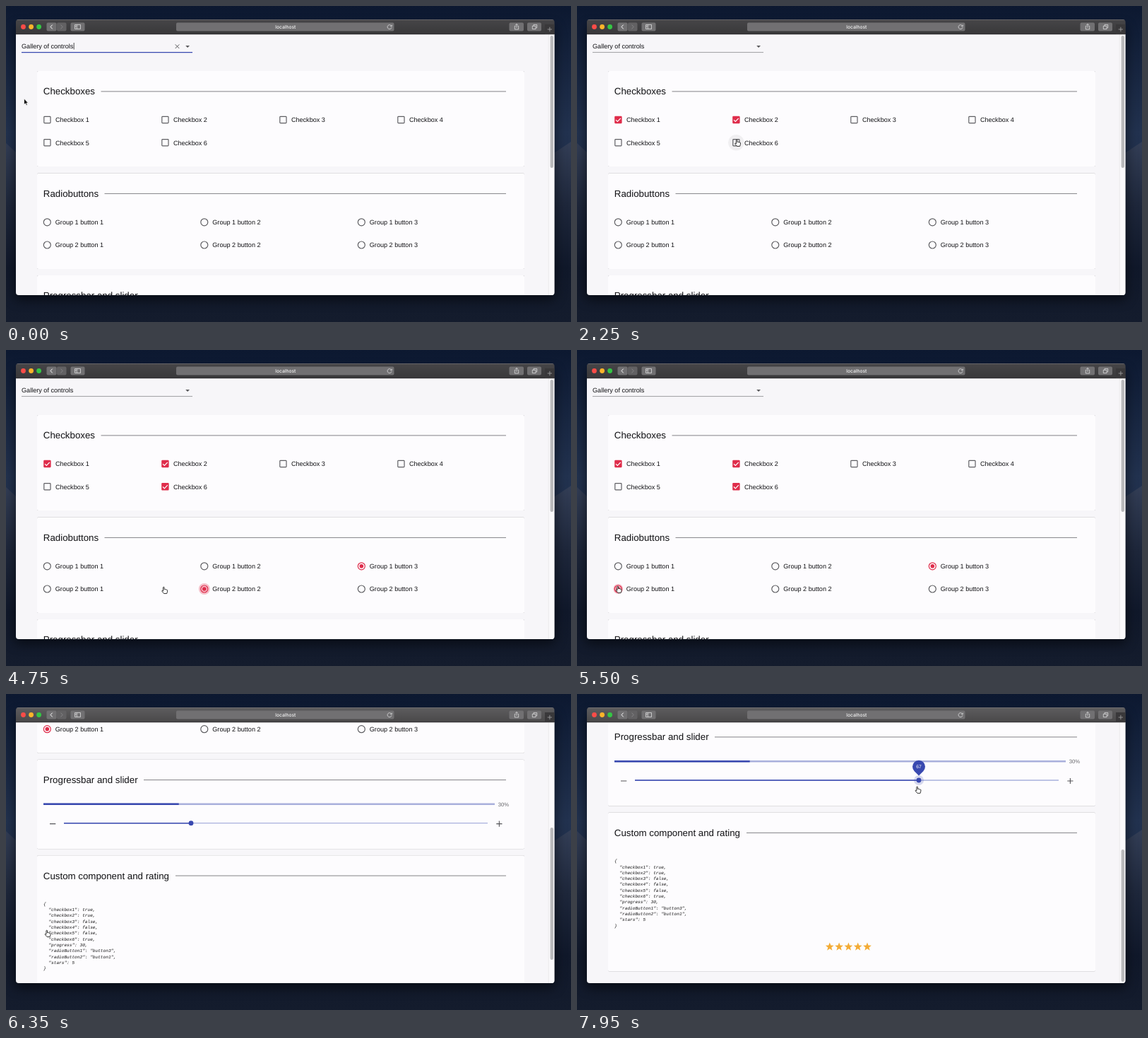
An HTML page that plays this animation: 800 by 447 pixels, repeating every 8000 ms.

```html
<!DOCTYPE html>
<html lang="en">
<head>
<meta charset="utf-8">
<title>Gallery of controls</title>
<style>
  html, body { margin: 0; width: 100%; height: 100%; overflow: hidden; background: #0e1626; }
  svg { display: block; width: 100vw; height: 100vh; }
  text { font-family: "Liberation Sans", Arial, sans-serif; text-rendering: geometricPrecision; white-space: pre; }
  .label { font-size: 9.1px; fill: #111114; }
  .title { font-size: 13.3px; fill: #111114; }
  .code { font: italic 6.14px "Liberation Mono", monospace; fill: #151515; }
  .card { fill: #fdfcfe; filter: drop-shadow(0 .9px .4px rgba(0,0,0,.42)); }
  .outline { fill: none; stroke: #5f5f63; stroke-width: 1.2; }
  .icon { fill: none; stroke: #dededf; stroke-width: .8; }
</style>
</head>
<body>
<svg viewBox="0 0 800 447" preserveAspectRatio="none">
  <defs>
    <linearGradient id="sky" x2="0" y2="1">
      <stop offset="0" stop-color="#0c1830"/>
      <stop offset=".4" stop-color="#22324f"/>
      <stop offset="1" stop-color="#18233a"/>
    </linearGradient>
    <linearGradient id="dune" x2="0" y2="1">
      <stop offset="0" stop-color="#333e56"/>
      <stop offset=".35" stop-color="#1e273b"/>
      <stop offset=".7" stop-color="#10182a"/>
      <stop offset="1" stop-color="#141c2d"/>
    </linearGradient>
    <linearGradient id="bar" x2="0" y2="1">
      <stop offset="0" stop-color="#5e5d5f"/>
      <stop offset="1" stop-color="#494849"/>
    </linearGradient>
    <filter id="blur" x="-10%" y="-10%" width="120%" height="125%"><feGaussianBlur stdDeviation="8"/></filter>
    <clipPath id="window"><rect x="14" y="19" width="762.5" height="390" rx="4"/></clipPath>
    <clipPath id="view"><rect x="14" y="40" width="762.5" height="369"/></clipPath>
  </defs>

  <rect width="800" height="447" fill="url(#sky)"/>
  <path d="M0 194L14 207L400 260L776 208L800 192V447H0Z" fill="url(#dune)"/>
  <rect x="12" y="28" width="766" height="388" rx="6" fill="#000" opacity=".5" filter="url(#blur)"/>

  <g clip-path="url(#window)">
    <rect x="14" y="40" width="763" height="369" fill="#f7f6f9"/>
    <g clip-path="url(#view)">
      <g id="page"></g>
      <rect x="768" y="40" width="9" height="369" fill="#faf9fb"/>
      <path d="M768.3 40V409" stroke="#e6e5e8" stroke-width=".7"/>
      <rect id="scrollThumb" x="770.6" y="42" width="4.4" height="187" rx="2.2" fill="#b9b9bb"/>
    </g>
    <rect x="14" y="19" width="763" height="21" fill="url(#bar)"/>
    <rect id="barShade" x="14" y="19" width="763" height="21" fill="#1c1b1e"/>
    <path d="M14 19.4H777" stroke="#7a797b" stroke-width=".7"/>
    <path d="M14 39.8H777" stroke="#29282a" stroke-width=".8"/>
    <circle cx="24.5" cy="29.5" r="3.4" fill="#fb4c48"/>
    <circle cx="35.6" cy="29.5" r="3.4" fill="#fdb42a"/>
    <circle cx="46.6" cy="29.5" r="3.4" fill="#35c644"/>
    <g fill="#717072">
      <rect x="57.5" y="23.5" width="14" height="12" rx="2"/>
      <rect x="72" y="23.5" width="13.5" height="12" rx="2" fill="#626163"/>
      <rect x="91.5" y="23.5" width="20" height="12" rx="2"/>
      <rect x="241" y="23.5" width="308.5" height="12" rx="2"/>
      <rect x="712.5" y="23.5" width="20.5" height="12" rx="2"/>
      <rect x="738" y="23.5" width="20" height="12" rx="2"/>
    </g>
    <rect x="763" y="26" width="14" height="14" fill="#39383a"/>
    <g class="icon">
      <path d="M65.7 26.6L63 29.5L65.7 32.4" stroke="#fff" stroke-width="1"/>
      <path d="M77.5 26.6L80.2 29.5L77.5 32.4" stroke="#8d8c8e"/>
      <path d="M97.5 26.5H105.5V32.5H97.5ZM100.3 26.5V32.5M98.3 28.2H99.5M98.3 29.6H99.5"/>
      <path d="M545.8 28.4A3 3 0 1 0 546 30.3M546.3 26.6V28.7H544.2"/>
      <path d="M721.5 28.3H720.3V33H725.7V28.3H724.5M723 30.8V25.5M721.4 27L723 25.4L724.6 27"/>
      <path d="M745.3 28.3H750V32.7H745.3ZM747 28.2V26.4H751.7V30.9H750.2"/>
      <path d="M766.7 33H773M769.9 29.8V36.2" stroke="#a5a4a6"/>
    </g>
    <text x="395.8" y="32" text-anchor="middle" fill="#f4f4f4" style="font:500 6.7px Inter,sans-serif">localhost</text>
  </g>
  <g id="cursor" stroke-linejoin="round">
    <path id="arrow" d="M0 0V8.5L2 6.7L3.3 9.6L4.8 9L3.5 6.2H6Z" fill="#111" stroke="#fff" stroke-width=".7"/>
    <path id="hand" transform="translate(0 -.5) scale(.9)" d="M-1.2 .8C-1.2 -.2 .6 -.2 .6 .8V4C1.5 3.2 2.3 3.6 2.4 4.2C3.2 3.6 4 4 4 4.7C5 4.2 5.6 4.8 5.6 5.6L5.4 7.6L4.6 10.4H0L-3 6.8C-3.4 5.8 -2.4 5.4 -1.8 6L-1.2 6.7Z" fill="#fff" stroke="#222" stroke-width="1"/>
  </g>
</svg>

<script>
const LOOP = 8000, RED = '#df2d4b', BLUE = '#3949b0', PALE = '#a9b0dc';
const BLUR_AT = 740, SCROLL = [5800, 6550, 349], PRESS_AT = 7020, DRAG = [7220, 7960];
const SLIDER = { x: 82, width: 600, y: 471 };

// time, x, y of the pointer tip
const PATH = [
  [200, 25.5, 131], [640, 58, 159], [880, 58, 159], [1300, 225, 159], [1650, 225, 159],
  [2200, 226.5, 189.5], [2600, 226.5, 189.5], [3350, 502, 304], [3620, 502, 304], [4254, 281, 336],
  [4580, 281, 336], [5095, 58, 334.7], [6580, 58, 334.7], [7000, 267, 122], [7220, 267, 122], [7960, 482, 131.5]
];

const $ = id => document.getElementById(id);
const page = $('page');
const clamp = v => Math.min(1, Math.max(0, v));
const smooth = p => p * p * (3 - 2 * p);
const between = (t, a, b) => clamp((t - a) / (b - a));

function set(node, attrs) {
  for (const key in attrs) node.setAttribute(key, attrs[key]);
  return node;
}
function add(tag, attrs, parent = page) {
  return parent.appendChild(set(document.createElementNS('http://www.w3.org/2000/svg', tag), attrs));
}
function text(x, y, content, attrs) {
  const node = add('text', { x, y, ...attrs });
  node.textContent = content;
  return node;
}
const line = (d, stroke, width) => add('path', { d, stroke, 'stroke-width': width, fill: 'none' });
const show = (node, visible) => { node.style.display = visible ? '' : 'none'; };

function card(y, height, title, ruleX) {
  add('rect', { class: 'card', x: 44, y, width: 690, height, rx: 1.8 });
  text(52.8, y + 33.4, title, { class: 'title' });
  line(`M${ruleX} ${y + 28.9}H708`, '#77777a', .9);
}

// Combo box
text(22, 59.8, 'Gallery of controls', { class: 'label' });
const comboLine = line('M22 65.6H264', '#88888b', .8);
const caret = line('M96.2 52V61.5', '#222', .8);
const clear = line('M239.7 54.4L245.3 60M245.3 54.4L239.7 60', '#59595c', 1);
add('path', { d: 'M254.2 56H260L257.1 59Z', fill: '#59595c' });

card(92, 135, 'Checkboxes', 134.5);
card(236.5, 135.5, 'Radiobuttons', 139.5);
card(381, 126.5, 'Progressbar and slider', 195);
card(516.5, 225, 'Custom component and rating', 240);

// Checkboxes and radio buttons
function control(x, y, label, click, radio, until = Infinity) {
  const halo = add('circle', { cx: x, cy: y });
  const off = radio
    ? add('circle', { class: 'outline', cx: x, cy: y, r: 5 })
    : add('rect', { class: 'outline', x: x - 4.6, y: y - 4.6, width: 9.2, height: 9.2, rx: .8 });
  const on = add('g', {});
  if (radio) {
    add('circle', { cx: x, cy: y, r: 5, fill: 'none', stroke: RED, 'stroke-width': 1.2 }, on);
    add('circle', { cx: x, cy: y, r: 2.8, fill: RED }, on);
  } else {
    add('rect', { x: x - 5.2, y: y - 5.2, width: 10.4, height: 10.4, rx: 1.1, fill: RED }, on);
    add('path', { d: `M${x - 3.4} ${y + .2}l2.3 2.3l4.5 -4.7`, fill: 'none', stroke: '#fff', 'stroke-width': 1.2 }, on);
  }
  text(x + 11.5, y + 3.2, label, { class: 'label' });
  return { x, y, halo, off, on, click, until };
}

const controls = [];
const checkClicks = { 0: 740, 1: 1380, 5: 2420 };
for (let i = 0; i < 6; i++) {
  controls.push(control(58.4 + i % 4 * 167, i < 4 ? 161 : 193.3, `Checkbox ${i + 1}`, checkClicks[i]));
}
const radioClicks = { 2: 3500, 3: 5350, 4: 4550 };
for (let i = 0; i < 6; i++) {
  const label = `Group ${i < 3 ? 1 : 2} button ${i % 3 + 1}`;
  controls.push(control(58.3 + i % 3 * 222.5, i < 3 ? 305.8 : 338, label, radioClicks[i], true, i === 4 ? radioClicks[3] : Infinity));
}

// Progress bar and slider
line('M53 444.2H692', PALE, 2.5);
line('M53 444.2H244.7', BLUE, 2.5);
text(696.8, 447, '30%', { 'font-size': 7.7, fill: '#6c6c70' });
line('M62 472H70.3', '#555559', 1.1);
line('M694.3 472H702.5M698.4 467.9V476.1', '#555559', 1.1);
line(`M${SLIDER.x} ${SLIDER.y}H${SLIDER.x + SLIDER.width}`, PALE, 1.3);
const filled = line('', BLUE, 1.5);
const knob = add('g', {});
const knobHalo = add('circle', { fill: BLUE, opacity: .2 }, knob);
add('circle', { r: 3.4, fill: BLUE }, knob);
const pin = add('g', {}, knob);
add('path', { d: 'M0 -6.5L-6.3 -12.8A9 9 0 1 1 6.3 -12.8Z', fill: BLUE }, pin);
const pinText = add('text', { y: -16.8, 'text-anchor': 'middle', 'font-size': 6.8, fill: '#fff' }, pin);

// State printout and rating
const state = {
  checkbox1: true, checkbox2: true, checkbox3: false, checkbox4: false, checkbox5: false, checkbox6: true,
  progress: 30, radioButton1: 'button3', radioButton2: 'button1', stars: 5
};
JSON.stringify(state, null, 2).split('\n').forEach((row, i) =>
  text(53, 587.2 + i * 8.3, row, { class: 'code' }));

const starPoints = Array.from({ length: 10 }, (_, i) => {
  const r = i % 2 ? 2.6 : 6.2, a = i * Math.PI / 5;
  return [r * Math.sin(a), -r * Math.cos(a)].map(v => v.toFixed(2));
}).join(' ');
for (let i = 0; i < 5; i++) {
  add('polygon', { points: starPoints, fill: '#f3ab35', transform: `translate(${357.8 + i * 13.3} 706.7)` });
}

function pointerAt(t) {
  const i = PATH.findIndex(p => p[0] > t);
  if (i < 1) return PATH[i ? PATH.length - 1 : 0].slice(1);
  const [t0, x0, y0] = PATH[i - 1], [t1, x1, y1] = PATH[i];
  const p = smooth(between(t, t0, t1));
  return [x0 + (x1 - x0) * p, y0 + (y1 - y0) * p];
}

function isHand(t, x, y) {
  if (t > 6580) return t > PRESS_AT || Math.abs(y - 122) < 8;
  return x > 50 && [161, 193, 306, 338].some(row => Math.abs(y - row) < 11);
}

function drawControl(c, t, x, y) {
  const checked = t >= c.click && t < c.until;
  show(c.on, checked);
  show(c.off, !checked);
  const age = t - c.click;
  if (age >= 0 && age < 850) {
    const p = clamp(age / 550), out = 1 - (1 - p) ** 2;
    set(c.halo, { r: 3 + 8.3 * out, fill: RED, opacity: (.38 - .25 * p) * (1 - between(age, 600, 850)) });
  } else {
    const hover = t < SCROLL[0] && Math.hypot(x - c.x, y - c.y) < 11;
    set(c.halo, { r: 11.3, fill: '#000', opacity: hover ? .05 : 0 });
  }
}

function drawSlider(t) {
  const value = 30 + Math.round(37 * smooth(between(t, ...DRAG)));
  const x = SLIDER.x + SLIDER.width * value / 100;
  set(filled, { d: `M${SLIDER.x} ${SLIDER.y}H${x}` });
  set(knob, { transform: `translate(${x} ${SLIDER.y})` });
  const grow = smooth(between(t, PRESS_AT, PRESS_AT + 150));
  const pulse = 8.75 + 1.75 * Math.cos((t - 7200) / 1500 * 2 * Math.PI);
  set(knobHalo, { r: pulse * grow });
  set(pin, { transform: `scale(${grow})` });
  pinText.textContent = value;
}

function draw(t) {
  const focused = t < BLUR_AT;
  set(comboLine, { stroke: focused ? BLUE : '#88888b', 'stroke-width': focused ? 1.4 : .8 });
  show(clear, focused);
  show(caret, focused && t % 1000 < 500);

  const scroll = SCROLL[2] * smooth(between(t, SCROLL[0], SCROLL[1]));
  set(page, { transform: `translate(0 ${-scroll})` });
  set($('scrollThumb'), { y: 42 + scroll * .51 });
  // The translucent toolbar brightens once the page slides beneath it
  set($('barShade'), { opacity: .35 * (1 - clamp(scroll / 36)) });

  const [x, y] = pointerAt(t), hand = isHand(t, x, y);
  set($('cursor'), { transform: `translate(${x} ${y})` });
  show($('hand'), hand);
  show($('arrow'), !hand);

  controls.forEach(c => drawControl(c, t, x, y));
  drawSlider(t);
}

function tick() {
  draw(performance.now() % LOOP);
  requestAnimationFrame(tick);
}
tick();
</script>
</body>
</html>
```
